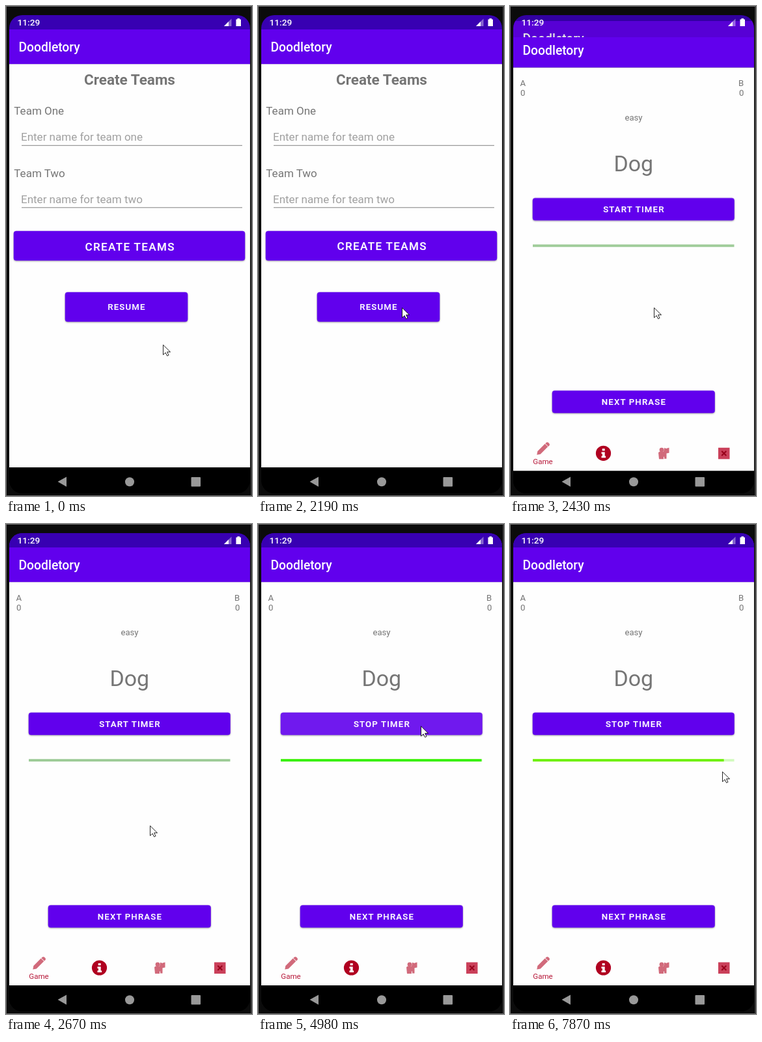
An HTML page for the animation above (7990 ms loop, 378 by 753 pixels).

```html
<!DOCTYPE html>
<html lang="en">
<head>
<meta charset="utf-8">
<title>Team drawing game</title>
<style>
  :root { --loop: 7990ms linear infinite; --glide: cubic-bezier(.4, 0, .2, 1); }
  html, body { margin: 0; width: 100%; height: 100%; overflow: hidden; background: #0b0b0b; }
  svg { display: block; }

  text { font-family: Roboto, "Noto Sans", sans-serif; font-size: 13.2px; fill: #757575; }
  .mid { text-anchor: middle; }
  .clock { font-size: 13.7px; font-weight: 500; fill: #fff; }
  .title { font-size: 19.3px; font-weight: 500; fill: #fff; }
  .head { font-size: 22.5px; font-weight: 700; }
  .label, .hint { font-size: 17px; }
  .hint { fill: #a0a0a0; }
  .word { font-size: 33.9px; }
  .tab { font-size: 11.6px; fill: #b7193a; }
  .cap { font-weight: 500; fill: #fff; stroke: #fff; stroke-width: .2px; letter-spacing: 1.18px; text-anchor: middle; }
  .big { font-size: 17px; letter-spacing: 1.38px; }
  .soft { fill: #d16a7b; }
  .btn { fill: #6100ed; stroke: #6100ed; stroke-width: .6px; filter: drop-shadow(0 1px 1px rgba(0, 0, 0, .34)); }

  /* Button presses: each starts after its own delay */
  .press { animation: lift var(--loop); }
  .ripple { overflow: hidden; }
  .ripple circle { fill: #fff; opacity: 0; transform-box: fill-box; transform-origin: center; animation: wave var(--loop); }
  .resume, .resume circle { animation-delay: 1320ms !important; }
  .timer, .timer circle { animation-delay: 4710ms !important; }
  @keyframes lift {
    0%, 1.5% { filter: drop-shadow(0 3px 2px rgba(0, 0, 0, .34)); }
    3%, 100% { filter: drop-shadow(0 1px 1px rgba(0, 0, 0, .34)); }
  }
  @keyframes wave {
    0% { opacity: .1; transform: scale(.25); }
    1.5% { transform: scale(1); }
    3.6% { opacity: .1; }
    6.6%, 100% { opacity: 0; transform: scale(1); }
  }

  /* Game page slides in over the setup page */
  #setup { animation: leave var(--loop); }
  #dim { animation: shade var(--loop); }
  #curtain { animation: reveal var(--loop); }
  #game { animation: enter var(--loop); }
  @keyframes leave {
    0%, 27.41% { transform: translateY(0); animation-timing-function: var(--glide); }
    31.54%, 100% { transform: translateY(-13.6px); }
  }
  @keyframes shade {
    0%, 27.41% { opacity: 0; }
    30.4%, 100% { opacity: .1; }
  }
  @keyframes reveal {
    0%, 27.41% { transform: translateY(746px); animation-timing-function: var(--glide); }
    31.54%, 100% { transform: translateY(0); }
  }
  @keyframes enter {
    0%, 27.41% { transform: translateY(27px); animation-timing-function: var(--glide); }
    33.42%, 100% { transform: translateY(0); }
  }

  /* Sixty-second countdown */
  #bar { transform-origin: 35px 0; animation: drain var(--loop); }
  #track { animation: track var(--loop); }
  #start { animation: hide var(--loop); }
  #stop { animation: hide var(--loop) reverse; animation-name: show; animation-direction: normal; }
  @keyframes drain {
    0%, 59.94% { transform: scaleX(0); fill: rgb(52, 240, 0); }
    59.95% { transform: scaleX(1); fill: rgb(52, 240, 0); }
    100% { transform: scaleX(.9467); fill: rgb(112, 240, 0); }
  }
  @keyframes track {
    0%, 59.94% { fill: #9dcb97; }
    59.95%, 100% { fill: #d2fabe; }
  }
  @keyframes hide { 0%, 60.4% { opacity: 1; } 60.41%, 100% { opacity: 0; } }
  @keyframes show { 0%, 60.4% { opacity: 0; } 60.41%, 100% { opacity: 1; } }

  /* The pointer hops between a few stops */
  #cursor { animation: point 7990ms step-end infinite; }
  @keyframes point {
    0% { transform: translate(241px, 520px); animation-timing-function: steps(4); }
    6.7% { transform: translate(221px, 463px); }
    47.95% { transform: translate(214px, 440px); }
    49.8% { transform: translate(206px, 346px); }
    51.7% { transform: translate(229px, 325px); animation-timing-function: steps(2); }
    55.4% { transform: translate(250px, 310px); }
    62.5% { transform: translate(250px, 310px); animation-timing-function: steps(3); }
    67.3% { transform: translate(290px, 382px); }
    72.3% { transform: translate(290px, 382px); animation-timing-function: steps(2); }
    75.5% { transform: translate(319px, 382px); animation-timing-function: steps(3); }
    80.4% { transform: translate(337px, 381px); animation-timing-function: steps(3); }
    85.3%, 100% { transform: translate(326px, 380px); }
  }
</style>
</head>
<body>
<svg width="378" height="753" viewBox="0 0 378 753">
  <defs>
    <clipPath id="screen"><rect x="5" y="14" width="370" height="735" rx="20"/></clipPath>
    <clipPath id="uncover"><rect id="curtain" x="5" y="14" width="370" height="740"/></clipPath>
    <g id="window">
      <rect x="5" y="14" width="370" height="780"/>
      <rect x="5" y="14" width="370" height="23" fill="#3800b2"/>
      <rect x="5" y="89" width="370" height="620" fill="#fefefe"/>
      <rect x="5" y="89" width="370" height="1" opacity=".1"/>
      <rect x="5" y="36" width="370" height="53.200" fill="#6100ed"/>
      <text class="title" x="19.5" y="70">Doodletory</text>
    </g>
  </defs>

  <rect width="378" height="753" fill="#0b0b0b"/>
  <rect x=".5" y=".5" width="376.5" height="752" fill="none" stroke="#6b6b6b"/>

  <g clip-path="url(#screen)">
    <g id="setup">
      <use href="#window"/>
      <text class="head mid" x="190" y="120.700">Create Teams</text>
      <text class="label" x="12.3" y="167.2">Team One</text>
      <text class="hint" x="23" y="207">Enter name for team one</text>
      <text class="label" x="12.3" y="262.7">Team Two</text>
      <text class="hint" x="23" y="302.7">Enter name for team two</text>
      <path d="M24 214.3H363M24 309.8H363" stroke="#808080"/>
      <rect class="btn" x="12" y="346" width="355" height="45" rx="3.5"/>
      <text class="cap big" x="190.7" y="375.5">CREATE TEAMS</text>
      <rect class="btn press resume" x="91" y="440" width="188" height="45" rx="3.5"/>
      <svg class="ripple resume" x="91" y="440" width="188" height="45"><circle cx="130" cy="23" r="330"/></svg>
      <text class="cap" x="185.4" y="467.3">RESUME</text>
    </g>
    <rect id="dim" x="5" y="14" width="370" height="740"/>

    <g clip-path="url(#uncover)">
      <g id="game">
        <use href="#window"/>
        <text x="15.5" y="118.2">A</text>
        <text x="16" y="133.2">0</text>
        <text x="351" y="118.2">B</text>
        <text x="352" y="133.2">0</text>
        <text class="mid" x="190" y="171">easy</text>
        <text class="word mid" x="189.8" y="248.7">Dog</text>

        <rect class="btn press timer" x="35" y="290" width="309.5" height="34" rx="3.5"/>
        <svg class="ripple timer" x="35" y="290" width="309.5" height="34"><circle cx="215" cy="20" r="330"/></svg>
        <text class="cap" id="start" x="190.4" y="311.8">START TIMER</text>
        <text class="cap" id="stop" x="190.4" y="311.8">STOP TIMER</text>
        <rect id="track" x="35" y="361.2" width="309.5" height="3.8"/>
        <rect id="bar" x="35" y="361.2" width="309.5" height="3.8"/>

        <rect class="btn" x="65" y="586" width="249.5" height="34" rx="3.5"/>
        <text class="cap" x="190.4" y="607.8">NEXT PHRASE</text>

        <path class="soft" d="M41.3 684.5l1-5.500L53.700 667.500l4.500 4.500-11.500 11.500zM54.300 667l2-1.700h2.200l2.300 2.300v2.200l-1.900 1.800z"/>
        <text class="tab mid" x="50.5" y="699">Game</text>
        <circle cx="143.5" cy="682" r="11.6" fill="#b00020"/>
        <path d="M141.700 675h4v3.300h-4zM140.500 680.200h5.200v6h1.400v2.800h-6.600v-2.800h1.400v-3.200h-1.400z" fill="#fff"/>
        <g class="soft">
          <circle cx="233" cy="676.8" r="3.4"/>
          <path d="M228 681l2-1.500h6l1-5.500h2v1l5.500-1.500v8l-4 .8v8.200h-3.500v-3h-1v3.500h-7z"/>
        </g>
        <rect x="320" y="673.5" width="17.5" height="17.5" fill="#ca405a"/>
        <path d="M325.3 678.700l7 7m0-7l-7 7" stroke="#98001b" stroke-width="2"/>
      </g>
    </g>

    <text class="clock" x="17.5" y="30.3">11:29</text>
    <path d="M335 31L346.5 19.5V31z" fill="#fff" opacity=".4"/>
    <path d="M335 31L342 24V31z" fill="#fff"/>
    <path d="M353.5 20.500h2V19h3.500v1.500h2V31h-7.500z" fill="#fff"/>
    <g fill="#999">
      <path d="M79.500 731L93 723.500V738.700z"/>
      <circle cx="190" cy="731.2" r="7"/>
      <rect x="284.5" y="724" width="14.5" height="14.5" rx="1"/>
    </g>
  </g>
  <path id="cursor" d="M.5 .8V16l3.600-3.300 2.500 5 2.400-1.100-2.400-4.900h4.900z" fill="#fff" stroke="#000" stroke-width=".85"/>
</svg>
</body>
</html>
```
